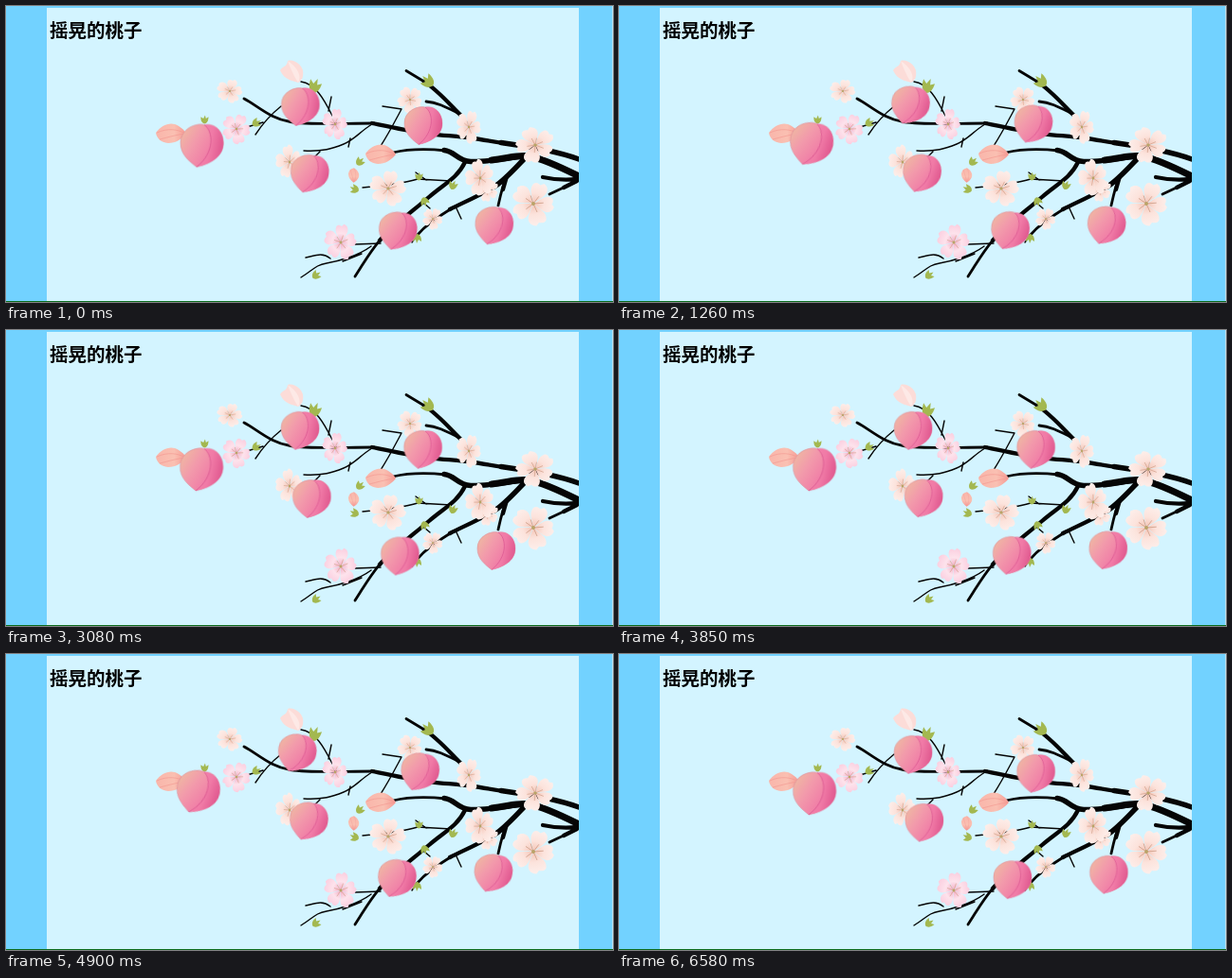
These frames come from a looping animation (640 px wide and 313 px high, 6650 ms). An HTML page without scripts:

```html
<!DOCTYPE html>
<html lang="zh">
<head>
<meta charset="utf-8">
<title>摇晃的桃子</title>
<style>
html, body { margin: 0; width: 100%; height: 100%; overflow: hidden; background: #72d2ff; }
svg { display: block; width: 100%; height: 100%; }
text { font: 700 19.5px "Noto Sans CJK SC", "Noto Sans CJK", sans-serif; }
.wood path { fill: none; stroke: #050505; stroke-linecap: round; stroke-linejoin: round; }
.upper, .lower { transform-origin: 27px 0; animation: 6.65s ease-in-out infinite; }
.upper { animation-name: upper; }
.lower { animation-name: lower; }
@keyframes upper {
  0%, 52.1% { transform: rotate(0deg); }
  26.05% { transform: rotate(11.5deg); }
  78.4% { transform: rotate(11.5deg); animation-timing-function: cubic-bezier(.45, 0, .72, .85); }
  100% { transform: rotate(.8deg); }
}
@keyframes lower {
  0% { transform: rotate(7deg); animation-timing-function: ease-out; }
  12.6% { transform: rotate(10deg); }
  44.2% { transform: rotate(0deg); }
  75.8% { transform: rotate(10deg); animation-timing-function: cubic-bezier(.45, 0, .75, .85); }
  100% { transform: rotate(1.4deg); }
}
</style>
</head>
<body>
<svg viewBox="0 0 640 313" preserveAspectRatio="none">
  <defs>
    <linearGradient id="skin" x1="0" y1=".2" x2=".75" y2=".65">
      <stop offset="0" stop-color="#efb8a2"/>
      <stop offset=".45" stop-color="#f29aab"/>
      <stop offset="1" stop-color="#f07aa6"/>
    </linearGradient>
    <linearGradient id="lobe" x1="0" y1=".2" x2="1" y2=".5">
      <stop offset="0" stop-color="#f487ae"/>
      <stop offset=".55" stop-color="#f07aa6"/>
      <stop offset="1" stop-color="#e0588f"/>
    </linearGradient>
    <radialGradient id="pale" gradientUnits="userSpaceOnUse" cx="0" cy="0" r="10">
      <stop offset="0" stop-color="#f3c3b4"/>
      <stop offset=".5" stop-color="#fce3dc"/>
      <stop offset="1" stop-color="#fdeeea"/>
    </radialGradient>
    <radialGradient id="rosy" gradientUnits="userSpaceOnUse" cx="0" cy="0" r="10">
      <stop offset="0" stop-color="#f4a9c4"/>
      <stop offset=".5" stop-color="#fde3ec"/>
      <stop offset="1" stop-color="#fbcfe0"/>
    </radialGradient>
    <linearGradient id="blush">
      <stop offset="0" stop-color="#f9b5aa"/>
      <stop offset=".6" stop-color="#fac0b2"/>
      <stop offset="1" stop-color="#f59a94"/>
    </linearGradient>

    <g id="peach">
      <path d="M22 1C14-1 0 5 0 18C0 29 8 35 15 40.500C26 38 40 32 40 18C40 7 32-1 22 1Z" fill="url(#skin)" stroke="#d98a98" stroke-width=".5"/>
      <path d="M22 1C31 7 32 27 15 40.500C26 38 40 32 40 18C40 7 32-1 22 1Z" fill="url(#lobe)"/>
      <path d="M22 1C31 7 32 27 15 40.500" fill="none" stroke="#dc5a92" stroke-width=".8"/>
    </g>
    <path id="petal" d="M0 0C-1.500-3-4.500-5-3.400-8.500C-2.500-10-1-9.500-.3-9L1-10.200C3.500-9.500 4.300-7 2.800-4.500C2-3 1-2 0 0Z"/>
    <g id="flower">
      <use href="#petal"/>
      <use href="#petal" transform="rotate(72) scale(1 .9)"/>
      <use href="#petal" transform="rotate(144) scale(1.100 1)"/>
      <use href="#petal" transform="rotate(216) scale(1 .95)"/>
      <use href="#petal" transform="rotate(288) scale(1.100 1)"/>
      <path d="M0 0L1-4M0 0L4-2M0 0L3 3M0 0L-2 3.500M0 0L-4-1M0 0L-2.500-3" fill="none" stroke="#d3a48f" stroke-width=".35"/>
      <circle r=".8" fill="#b9a468"/>
    </g>
    <g id="bud">
      <path d="M-16 0C-11-7-3-11 4-9C9-7 14-3 16 1C11 7 5 11-3 11C-11 10-15 6-16 0Z" fill="url(#blush)"/>
      <path d="M-15 0C-4-5 7-4 15 1C6 2-4 5-12 7" fill="none" stroke="#f2958f" stroke-width=".6"/>
    </g>
    <path id="leaf" d="M0 5C-4 3-4 0-4-3L-1-1L1-5L2-1L5-3C5 2 3 5 0 5Z" fill="#a3b850"/>
  </defs>

  <rect width="640" height="313" fill="#72d2ff"/>
  <rect x="43" y="2" width="561" height="310" fill="#d3f4ff"/>
  <rect y="312" width="640" height="1" fill="#0b6b1c"/>
  <rect x="639" width="1" height="312" fill="#b9e3f2"/>
  <text x="46" y="33">摇晃的桃子</text>

  <g class="wood">
    <g stroke-width="1.400">
      <path d="M311 80C326 82 335 98 344 116M340 111L343 96M290 106C280 114 272 122 263 136M271 123L254 128"/>
      <path d="M386 125C374 132 368 141 356 146S334 154 314 153M363 140L361 149M331 154L326 159"/>
      <path d="M397 106L417 109C410 122 404 134 395 148"/>
      <path d="M376 192C398 190 418 188 434 183L469 185M443 184L432 176"/>
      <path d="M395 251L368 252M385 254C372 264 350 270 338 272S324 279 311 287M342 267C333 260 326 264 316 266M375 262L355 270"/>
      <path d="M474 212L480 225M434 242L428 250M440 208L447 214"/>
    </g>
    <g stroke-width="2.800">
      <path d="M251 98C266 106 278 119 300 122.500S352 124 388 124"/>
      <path d="M422 68.500L441 80M443 101C456 102 466 108 478 114"/>
      <path d="M408 155C425 151 445 151 464 153"/>
      <path d="M394 248C386 257 378 270 368 286M470 214C454 224 442 232 433 243M527 182C523 192 521 202 519 211M573 199L590 191"/>
    </g>
    <g stroke-width="4.300">
      <path d="M386 124C410 129 424 132 437 134S480 138 490 139.500S512 143 524 145M441 80C454 88 466 102 479 115"/>
      <path d="M484 165C476 182 462 188 446 202S408 232 394 248M527 182C512 195 490 204 468 215M528 180L524 194"/>
      <path d="M566 181C580 184 592 184 602 183M588 192L602 185"/>
    </g>
    <path stroke-width="5.500" d="M462 152.500C474 154 476 164 490 164.500S530 161 548 158M522 144.500C548 148 580 153 604 162M549 159C538 170 526 184 515 191"/>
    <path stroke-width="7" d="M512 163C530 161 540 157 552 159S586 171 604 180"/>
  </g>
  <rect x="604" y="140" width="35" height="70" fill="#72d2ff"/>

  <use href="#leaf" transform="translate(209 120) scale(.9)"/>
  <use href="#leaf" transform="translate(264 123) rotate(60)"/>
  <use href="#leaf" transform="translate(325 84) scale(1.400 1.600) rotate(20)"/>
  <use href="#leaf" transform="translate(444 80) scale(1.500) rotate(-50)"/>
  <use href="#leaf" transform="translate(373 164) rotate(40)"/>
  <use href="#leaf" transform="translate(367 194) rotate(-70)"/>
  <use href="#leaf" transform="translate(471 189) rotate(20)"/>
  <use href="#leaf" transform="translate(442 207) rotate(160)"/>
  <use href="#leaf" transform="translate(435 180) scale(.9)"/>
  <use href="#leaf" transform="translate(434 246) rotate(180)"/>
  <use href="#leaf" transform="translate(327 284) rotate(50)"/>

  <g fill="url(#pale)">
    <use href="#flower" transform="translate(236 90) scale(1.450 1.250) rotate(15)"/>
    <use href="#flower" transform="translate(426 99) scale(1.400) rotate(40)"/>
    <use href="#flower" transform="translate(488 128) scale(1.400 1.750) rotate(20)"/>
    <use href="#flower" transform="translate(558 147) scale(2.150 1.900) rotate(50)"/>
    <use href="#flower" transform="translate(403 193) scale(2.050 1.900) rotate(10)"/>
    <use href="#flower" transform="translate(508 195) scale(1.200) rotate(50)"/>
    <use href="#flower" transform="translate(500 182) scale(1.600 2) rotate(-15)"/>
    <use href="#flower" transform="translate(556 209) scale(2.400 2.300) rotate(22)"/>
    <use href="#flower" transform="translate(450 225) scale(1.150) rotate(30)"/>
    <use href="#flower" transform="translate(299 165) scale(1.500 1.800) rotate(-10)"/>
  </g>
  <g fill="url(#rosy)">
    <use href="#flower" transform="translate(243 130) scale(1.600) rotate(25)"/>
    <use href="#flower" transform="translate(347 125) scale(1.400 1.650) rotate(10)"/>
    <use href="#flower" transform="translate(353 250) scale(1.800 1.900) rotate(5)"/>
  </g>
  <path d="M289 68C292 63 296 65 297 58C304 56 311 62 313 68C314 75 312 79 308 81C302 79 293 78 289 68Z" fill="#fcdcd8"/>
  <path d="M297 58C300 66 304 75 308 81C312 75 308 65 297 58Z" fill="#fde9e6"/>
  <use href="#bud" transform="translate(174 134)"/>
  <use href="#bud" transform="translate(395 156)"/>
  <use href="#bud" transform="translate(367 179) rotate(90) scale(.48 .55)"/>

  <g transform="translate(184 124.500) scale(1.130)"><use class="upper" href="#peach"/></g>
  <g transform="translate(290.500 86)"><use class="upper" href="#peach"/></g>
  <g transform="translate(420 106)"><use class="upper" href="#peach"/></g>
  <g transform="translate(302.500 158)"><use class="lower" href="#peach"/></g>
  <g transform="translate(395.500 218.500)"><use class="lower" href="#peach"/></g>
  <g transform="translate(497 213)"><use class="lower" href="#peach"/></g>
</svg>
</body>
</html>
```
